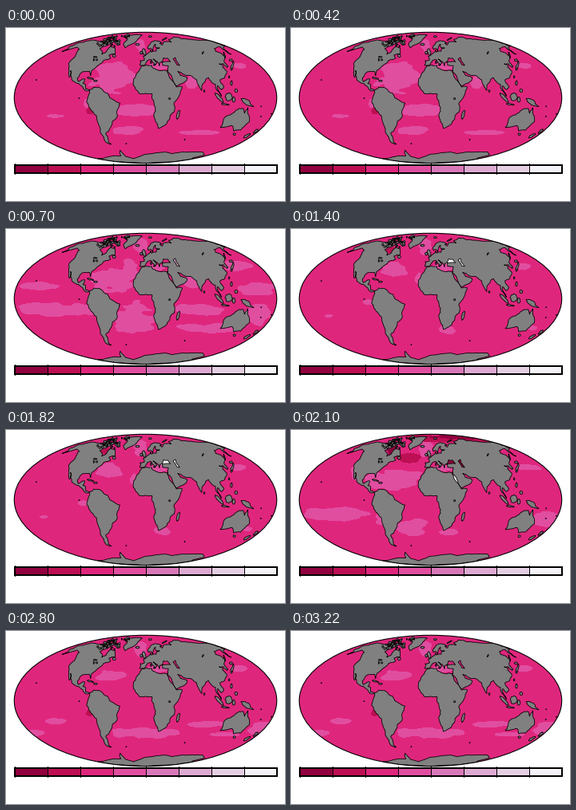
A matplotlib script for the animation above (3.5 s loop, 349 by 217 pixels).

```python
import numpy as np
import matplotlib.pyplot as plt
from matplotlib.animation import FuncAnimation
from matplotlib.colors import ListedColormap
from matplotlib.patches import Ellipse, Polygon, Rectangle

W, H, DPI = 349, 217, 128
PX = 72 / DPI
CX, CY, RX, RY = 174.5, 87.5, 164.2, 82.2
SCALE = ["#91003f", "#bd0f53", "#df267d", "#e04ea0",
         "#d878b8", "#ddaad2", "#e4cfe2", "#f5f2f7"]
DARKEST, DARK, SEA, LIGHT, LILAC, PALE = 0, 1, 2, 3, 5, 7

rng = np.random.default_rng(4)
fig = plt.figure(figsize=(W / DPI, H / DPI), dpi=DPI, facecolor="white")
ax = fig.add_axes([0, 0, 1, 1])
ax.axis("off")
globe = ax.add_patch(Ellipse((CX, CY), 2 * RX, 2 * RY, fc="none", ec="black",
                             lw=1.1 * PX, zorder=6))


def mollweide(lonlat):
    """Longitude and latitude in degrees to stage pixels."""
    lon, lat = np.array(lonlat, float).T
    target = np.pi * np.sin(np.radians(lat))
    t = np.radians(lat) * 0.9
    for _ in range(30):
        slope = np.maximum(2 + 2 * np.cos(2 * t), 1e-6)
        t = np.clip(t - (2 * t + np.sin(2 * t) - target) / slope,
                    -np.pi / 2, np.pi / 2)
    return np.column_stack([CX + RX * lon / 180 * np.cos(t),
                            CY - RY * np.sin(t)])


def rough(pts, amp, levels):
    """Split every edge and shift the midpoints a little."""
    for _ in range(levels):
        nxt = np.roll(pts, -1, axis=0)
        size = np.hypot(*(nxt - pts).T)[:, None]
        shift = rng.uniform(-amp, amp, pts.shape) * np.minimum(size, 8)
        pts = np.stack([pts, (pts + nxt) / 2 + shift], 1).reshape(-1, 2)
    return pts


def coast(pts, color="#808080", z=3):
    shape = Polygon(pts, fc=color, ec="black", lw=0.8 * PX, zorder=z)
    ax.add_patch(shape)
    shape.set_clip_path(globe)
    return shape


def land(*lonlat, amp=0.13):
    coast(rough(mollweide(lonlat), amp, 2))


def isle(lon, lat, a, b, tilt=0):
    """Ragged ellipse with pixel radii a, b; tilt is clockwise."""
    t = np.linspace(0, 2 * np.pi, 9)[:-1]
    c, s = np.cos(np.radians(tilt)), np.sin(np.radians(tilt))
    x, y = a * np.cos(t), b * np.sin(t)
    pts = np.column_stack([x * c - y * s, x * s + y * c])
    coast(rough(pts + mollweide([(lon, lat)]), 0.2, 1))


def noise(gen, x, y, waves=40):
    """Smooth random field, stretched along the parallels."""
    total = 0
    for _ in range(waves):
        kx, ky = gen.normal(0, 0.13), gen.normal(0, 0.35)
        total = total + np.cos(kx * x + ky * y + gen.uniform(0, 2 * np.pi))
    return total / np.sqrt(waves)


def field(seed, light, other=()):
    """Sea levels: each region is an ellipse (x, y, rx, ry) worn by noise."""
    y, x = np.mgrid[0:H, 0:W] + 0.5
    wear = 0.38 * noise(np.random.default_rng(seed), x, y)
    levels = np.full((H, W), SEA)
    regions = [(LIGHT, *r) for r in EVERY_TIME + light] + list(other)
    for level, cx, cy, rx, ry in regions:
        inside = 1 - ((x - cx) / rx) ** 2 - ((y - cy) / ry) ** 2
        levels[inside + wear > 0] = level
    return levels


# North America
land((-168, 66), (-157, 71), (-128, 70), (-95, 69), (-95, 72), (-82, 69),
     (-87, 65), (-93, 62), (-95, 59), (-82, 54), (-80, 51), (-77, 57),
     (-77, 62), (-64, 60), (-56, 52), (-66, 50), (-60, 46), (-70, 43),
     (-76, 36), (-81, 31), (-80, 25), (-84, 30), (-94, 29.5), (-98, 22),
     (-95, 18), (-90, 21), (-87, 21), (-88, 16), (-84, 15), (-83, 10),
     (-77, 8.5), (-83, 8), (-94, 16), (-105, 20), (-113, 31), (-110, 23),
     (-117, 32.5), (-124, 40), (-124, 48), (-135, 58), (-148, 61),
     (-162, 55), (-158, 58), (-165, 61))
# South America
land((-77, 8.5), (-72, 12), (-62, 10.5), (-52, 5), (-49, 0), (-35, -6),
     (-39, -13), (-41, -22), (-48, -26), (-54, -34), (-58, -38), (-65, -41),
     (-66, -48), (-69, -52), (-66, -55), (-74, -52), (-73, -40), (-70, -20),
     (-76, -14), (-81, -5), (-78, 3))
# Africa
land((-6, 36), (10, 37), (11, 34), (20, 31), (34, 31), (32.5, 29), (37, 20),
     (43, 12), (51, 12), (46, 2), (39, -6), (40.5, -15), (35, -20), (35, -24),
     (31, -30), (20, -35), (15, -27), (12, -18), (14, -11), (9, -1), (9, 4.5),
     (-8, 4.5), (-13, 9), (-17, 14), (-17, 21), (-10, 30))
# Europe and Asia
EUROPE = [(34, 31), (36, 36.5), (27, 37), (27, 41), (41, 41.5), (38, 46),
          (31, 46.5), (28, 42), (23, 40.5), (22, 36.5), (19, 42), (13, 45),
          (18.5, 40), (16, 38), (10, 44), (3, 43), (-2, 37), (-9, 37),
          (-9, 43), (-2, 43.5), (-4, 48.5), (8, 54), (10, 57), (11, 54),
          (20, 55), (23, 59), (30, 60), (22, 60.5), (24, 65.5), (17, 61),
          (14, 55.5), (11, 59), (6, 58), (5, 61), (16, 69), (28, 71),
          (41, 67), (35, 66.5), (38, 64), (45, 68)]
ASIA = [(68, 69), (69, 73), (87, 75), (104, 77.7), (113, 74), (140, 72.5),
        (180, 69), (177, 62.5), (163, 59.5), (157, 51), (156, 57), (163, 61.5),
        (143, 59), (136, 55), (141, 53), (140, 48), (130, 42.5), (129, 36),
        (126, 34.5), (125, 39), (118, 39), (122, 37), (119.5, 35), (122, 30),
        (114, 22.5), (106, 20), (109, 12), (105, 9), (100.5, 13.5), (100, 9),
        (104, 1.5), (98.5, 8.5), (98, 15), (94, 17), (91, 22.5), (87, 21.5),
        (80.5, 15.5), (77.5, 8), (73, 20), (66, 25), (57, 26), (48, 30),
        (51, 25), (60, 22.5), (55, 17.5), (43, 13), (35, 28), (32.5, 30)]
land(*EUROPE, *ASIA)
# Australia, New Guinea, Greenland, Antarctica
land((114, -22), (122, -18), (130, -12), (136, -12), (140, -17.5), (142, -11),
     (146, -19), (153, -27), (150, -37), (140, -38), (135, -34), (131, -31.5),
     (124, -33), (115, -34))
land((131, -1), (141, -2.5), (150, -10), (139, -8), (133, -4))
land((-73, 78), (-60, 82), (-15, 81.5), (-24, 70.5), (-43, 60), (-53, 66),
     (-58, 75))
land((-180, -78), (-150, -77), (-100, -73), (-74, -73), (-66, -68),
     (-58, -63.5), (-61, -74), (-45, -78), (-25, -75), (0, -70), (50, -66.5),
     (70, -69), (90, -66.5), (140, -66.5), (165, -71), (165, -77), (180, -78),
     (180, -84), (180, -90), (-180, -90), (-180, -84), amp=0.04)

# Islands: Atlantic, Arctic, East Asia, south, then lakes
for spec in [(-2.5, 54, 2, 4.5, -12), (-8, 53, 1.5, 2), (-19, 65, 2.6, 1.3),
             (-79, 21.8, 4.3, 0.8, 15), (-71, 19, 2.4, 0.9), (-56, 49, 2, 1.8),
             (9, 41, 0.6, 1.8), (14, 37.5, 1.3, 0.6)]:
    isle(*spec)
for spec in [(-72, 68, 4.5, 2, 40), (-80, 80, 4, 1.5, -20), (-110, 71, 3.5, 2),
             (-121, 73, 2, 1.4), (18, 78.5, 2, 1), (59, 74, 3.5, 0.8, -30)]:
    isle(*spec)
for spec in [(137, 37, 1.2, 6, 12), (143, 43.5, 2, 1.4), (131, 32.5, 1, 1.5),
             (142.5, 50, 0.7, 4, -15), (121, 23.5, 0.7, 1.5),
             (121, 16.5, 1.3, 3), (125, 8, 2, 2), (114, 1, 4.5, 5),
             (101, 0, 1.7, 8, -42), (110, -7.3, 5, 0.9, 8),
             (121, -2, 1.8, 3.5)]:
    isle(*spec)
for spec in [(146.5, -42, 1.6, 1.4), (171, -44, 1.2, 5, 60),
             (176, -38.5, 1.2, 4, 50), (46.5, -19, 1.7, 6, 15),
             (81, 7.5, 0.9, 1.4)]:
    isle(*spec)
for spec in [(-88, 47.5, 2.5, 0.7), (-87, 44, 0.6, 1.6), (-82, 44, 1.2, 1.1),
             (33, -1, 1.1, 1.1), (108, 53, 0.6, 1.8, 30)]:
    isle(*spec)
for _ in range(45):
    isle(rng.uniform(-128, -64), rng.uniform(62, 80), *rng.uniform(0.4, 1.5, 2))
for lon, lat in [(-155.5, 20), (165, -21), (160, -9.5), (70, -49),
                 (-37, -54.3), (-91, -0.5), (178, -18)]:
    isle(lon, lat, 0.5, 0.5)
caspian = coast(mollweide([(47, 45), (52, 47), (51, 43), (54, 37), (50, 37.5),
                           (49, 41)]), z=4)

# Sea fields
EVERY_TIME = [(168, 22, 8, 11), (190, 48, 13, 4), (291, 47, 10, 4)]
fields = [
    field(1, [(137, 62, 28, 19), (163, 103, 23, 8), (152, 129, 18, 5),
              (232, 67, 8, 8), (63, 110, 14, 3), (238, 131, 26, 3),
              (102, 95, 4, 5)], [(DARK, 105, 104, 4, 4)]),
    field(2, [(132, 65, 28, 15), (155, 52, 9, 15), (163, 112, 28, 18),
              (60, 101, 48, 8), (42, 72, 26, 5), (238, 101, 28, 7),
              (252, 124, 38, 6), (290, 46, 20, 6), (314, 76, 26, 7),
              (315, 107, 14, 14), (232, 68, 12, 8)]),
    field(3, [(130, 51, 20, 8), (98, 92, 6, 3), (160, 62, 5, 7),
              (195, 126, 12, 5), (48, 109, 7, 2), (300, 124, 8, 3)],
          [(PALE, 199, 39, 8, 5), (DARK, 127, 27, 6, 4)]),
    field(4, [(135, 62, 27, 13), (107, 63, 13, 10), (55, 106, 42, 8),
              (118, 112, 14, 10), (153, 123, 19, 11), (318, 112, 17, 10),
              (298, 47, 16, 4), (198, 128, 11, 4), (80, 55, 5, 9)],
          [(DARK, 148, 36, 14, 6), (DARK, 205, 10, 60, 6),
           (DARKEST, 215, 8, 40, 4), (DARKEST, 127, 26, 8, 7),
           (DARKEST, 199, 39, 8, 5), (PALE, 207, 60, 4, 7)]),
    field(5, [(131, 54, 19, 9), (172, 128, 40, 7), (250, 117, 28, 4),
              (321, 123, 18, 8), (63, 113, 14, 4), (33, 128, 16, 4),
              (272, 130, 18, 3)], [(DARK, 105, 103, 4, 4)]),
]
caspian_levels = [SEA, LILAC, PALE, DARKEST, SEA]
sea = ax.imshow(fields[0], cmap=ListedColormap(SCALE), vmin=-0.5, vmax=7.5,
                extent=(0, W, H, 0), interpolation="nearest", aspect="auto",
                zorder=1)
sea.set_clip_path(globe)

# Colour bar
LEFT, RIGHT, TOP, BOTTOM = 11, 339, 172, 182
step = (RIGHT - LEFT) / len(SCALE)
for k, color in enumerate(SCALE):
    x = LEFT + k * step
    ax.add_patch(Rectangle((x, TOP), step, BOTTOM - TOP, fc=color, lw=0,
                           aa=False, zorder=7))
    ax.plot([x, x], [TOP - 2, BOTTOM + 1], color="black", lw=PX, zorder=8)
ax.add_patch(Rectangle((LEFT, TOP), RIGHT - LEFT, BOTTOM - TOP, fc="none",
                       ec="black", lw=2 * PX, zorder=9))
ax.set(xlim=(0, W), ylim=(H, 0))


def update(i):
    sea.set_data(fields[i])
    caspian.set_facecolor(SCALE[caspian_levels[i]])
    return sea, caspian


anim = FuncAnimation(fig, update, frames=len(fields), interval=700,
                     repeat=True, repeat_delay=0)
plt.show()
```
